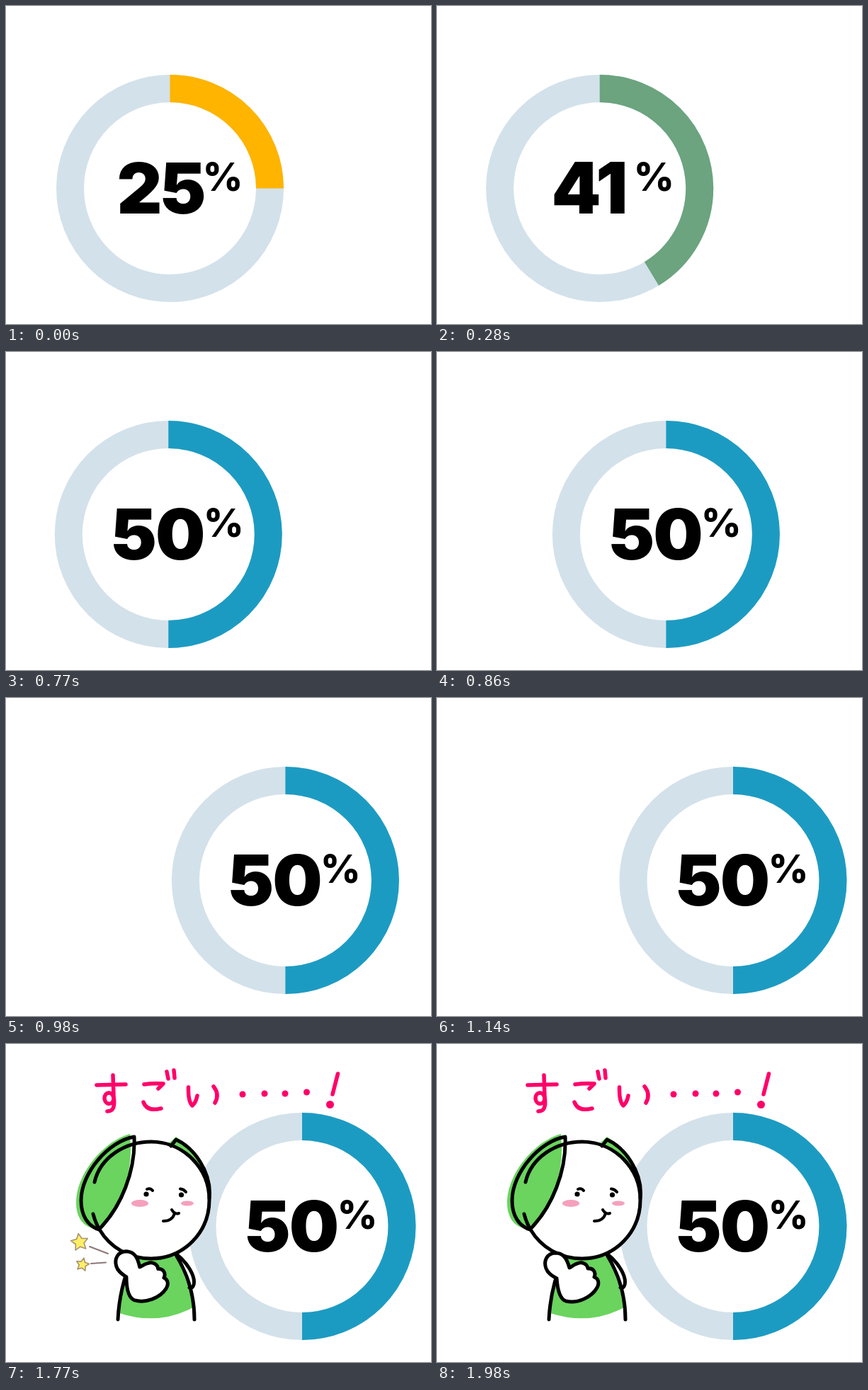
An HTML page for the animation above (2050 ms loop, 600 by 449 pixels).

```html
<!DOCTYPE html>
<html lang="ja">
<head>
<meta charset="utf-8">
<title>50%</title>
<style>
  html, body { margin: 0; width: 100%; height: 100%; overflow: hidden; background: #fff; }
  svg { display: block; width: 100%; height: 100%; }
  text { font-family: Inter, "Open Sans", sans-serif; text-anchor: middle; }
  #number { font-size: 99px; font-weight: 900; letter-spacing: -2px; }
  #percent { font-size: 55px; font-weight: 800; font-optical-sizing: none; }
  .ink { fill: none; stroke: #000; stroke-width: 5; stroke-linecap: round; stroke-linejoin: round; }
  .fine { stroke-width: 4; }
  .pink { fill: none; stroke: #ff0069; stroke-width: 5.5; stroke-linecap: round; stroke-linejoin: round; }
  .dot { fill: #ff0069; stroke: none; }
  .green { fill: #6ad45e; }
  .cheek { fill: #f5a0bc; }
  .star { fill: #ffee66; stroke: #a8936f; stroke-width: 1.6; stroke-linejoin: round; }
  .ray { stroke: #8e7779; stroke-width: 2; stroke-linecap: round; }
</style>
</head>
<body>
<svg viewBox="0 0 600 449">
  <g id="chart">
    <g id="ring" fill="none" stroke-width="39">
      <circle r="141" stroke="#d3e1ea"/>
      <circle id="arc" r="141" pathLength="360" transform="rotate(-90)"/>
    </g>
    <g id="label">
      <text id="number" y="293"></text>
      <text id="percent" x="306" y="260.500">%</text>
    </g>
  </g>

  <g id="character">
    <path fill="#fff" d="M240 297C258 310 268 330 265 340Q262 347 258 345Z"/>
    <path class="green" d="M176 302L240 300Q256 330 264 372Q215 398 160 380Q164 335 176 302Z"/>
    <path class="ink" d="M178 302Q160 345 158 389M240 298Q266 340 266 389M241 297C256 309 268 328 265 340Q263 346 259 344"/>
    <g id="sleeve">
      <path fill="#fff" d="M174 320Q181 317 187 320L192 346Q178 347 171 338Z"/>
      <path class="ink fine" d="M170 338Q178 347 190 346"/>
    </g>
    <path class="green" d="M230 140L240 131C266 147 287 176 288 212L250 160Z"/>
    <ellipse cx="205.5" cy="220.5" rx="81" ry="82.5" fill="#fff"/>
    <path class="green" d="M175 127C138 137 99 183 99 224C99 246 110 261 131 261C160 232 177 190 176 145Z"/>
    <path class="ink" d="M181 131C145 137 106 182 106 221C106 243 116 257 131 262C163 230 183 179 181 131Z"/>
    <path class="ink" d="M125 195C133 160 168 138 205 138C250 138 287 175 287 220C287 266 251 303 205 303C173 303 147 287 132 262Q126 252 123 240"/>
    <path class="ink" d="M233 144L240 135C265 146 291 181 287 218"/>
    <circle cx="198" cy="212" r="3.6"/>
    <circle cx="247.500" cy="213" r="3.6"/>
    <path class="ink fine" d="M199 205Q204 203 207 207M246 204.500Q251 205 254 209M222 250Q235 250 238 239M234 234Q238 241 244 239"/>
    <ellipse class="cheek" cx="189" cy="225" rx="12" ry="5"/>
    <ellipse class="cheek" cx="256" cy="225" rx="9" ry="3.500"/>
    <path id="hand" class="ink" style="fill:#fff" d="M187 316C183 302 178 295 167 295C155 296 150 306 154 317C157 325 164 328 169 331C170 345 173 360 182 363C198 367 218 358 226 344C230 336 227 331 222 329C225 322 220 316 213 317C212 310 204 307 198 310C193 311 190 315 187 316Z"/>
  </g>

  <g id="stars">
    <path class="ray" d="M118 286L144 296M120 310L141 308.500"/>
    <path id="bigStar" class="star"/>
    <path id="smallStar" class="star"/>
  </g>

  <g id="lettering" class="pink">
    <path d="M128 58L169 57M151 44L152 74C154 88 152 95 143 95M152 76C150 66 139 67 139 77C140 87 152 87 152 76"/>
    <path d="M195 57Q208 55 222 56L215 63M194 82Q199 96 219 91M227 39L229 49M237 37L238 48"/>
    <path d="M257.500 61Q257 81 263 87Q268 83 270 73M293 60Q302 71 295 83"/>
    <circle class="dot" cx="334" cy="71" r="4.500"/>
    <circle class="dot" cx="365" cy="70" r="4.500"/>
    <circle class="dot" cx="394" cy="70" r="4.500"/>
    <circle class="dot" cx="424.500" cy="68" r="4.500"/>
    <g><path d="M468.500 42L461 71"/><circle class="dot" cx="457.500" cy="85.500" r="5.500"/></g>
  </g>
</svg>
<script>
const LOOP = 2050;
const YELLOW = [255, 180, 0];
const BLUE = [28, 155, 194];
const LETTER_TIMES = [1210, 1270, 1340, 1400, 1480, 1560, 1640, 1740];

const el = id => document.getElementById(id);
const set = (id, name, value) => el(id).setAttribute(name, value);
const show = (node, on) => node.setAttribute("visibility", on ? "visible" : "hidden");
const progress = (t, from, to) => Math.min(1, Math.max(0, (t - from) / (to - from)));
const mix = (a, b, p) => a + (b - a) * p;
const smooth = p => p * p * (3 - 2 * p);
const easeOut = (p, power) => 1 - (1 - p) ** power;
const scaleAt = (x, y, s) => `translate(${x} ${y}) scale(${s}) translate(${-x} ${-y})`;

function starPath(cx, cy, radius, turn) {
  const points = Array.from({ length: 10 }, (_, i) => {
    const r = i % 2 ? radius * 0.5 : radius;
    const a = (i * 36 - 90 + turn) * Math.PI / 180;
    return `${cx + r * Math.cos(a)} ${cy + r * Math.sin(a)}`;
  });
  return `M${points.join("L")}Z`;
}

function drawChart(t) {
  const sweep = smooth(progress(t, 70, 420));
  const drift = easeOut(progress(t, 70, 770), 2);
  const slide = 190 * easeOut(progress(t, 770, 1140), 2.47);
  const color = YELLOW.map((c, i) => Math.round(mix(c, BLUE[i], sweep)));
  const pulse = 1 + 0.13 * Math.sin(Math.PI * progress(t, 270, 770));

  set("chart", "transform", `translate(${slide} 0)`);
  set("ring", "transform", `translate(${mix(231.5, 228, drift)} 257.5)`);
  set("arc", "stroke", `rgb(${color})`);
  set("arc", "stroke-dasharray", `${mix(90, 180, sweep)} 360`);
  set("label", "transform", scaleAt(274, 240, pulse));
  set("number", "x", mix(218.5, 213, sweep));
  el("number").textContent = Math.round(mix(25, 50, sweep));
}

function drawCharacter(t) {
  const grow = smooth(progress(t, 1430, 1660));
  const wobble = 3.5 * Math.sin(Math.PI * progress(t, 1620, 1920));
  show(el("character"), t >= 1210);
  set("sleeve", "opacity", 1 - grow);
  set("hand", "transform", `${scaleAt(224, 350, mix(0.63, 1, grow))} rotate(${wobble} 205 345)`);
}

function drawStars(t) {
  show(el("stars"), t >= 1680 && t < 1980);
  set("stars", "transform", `translate(${-20 * smooth(progress(t, 1785, 1940))} 0)`);
}

function render(t) {
  drawChart(t);
  drawCharacter(t);
  drawStars(t);
  [...el("lettering").children].forEach((node, i) => show(node, t >= LETTER_TIMES[i]));
}

set("bigStar", "d", starPath(104, 280, 12.5, -8));
set("smallStar", "d", starPath(108, 311.5, 9.5, 12));

const start = performance.now();
function tick() {
  render((performance.now() - start) % LOOP);
  requestAnimationFrame(tick);
}
render(0);
requestAnimationFrame(tick);
</script>
</body>
</html>
```
